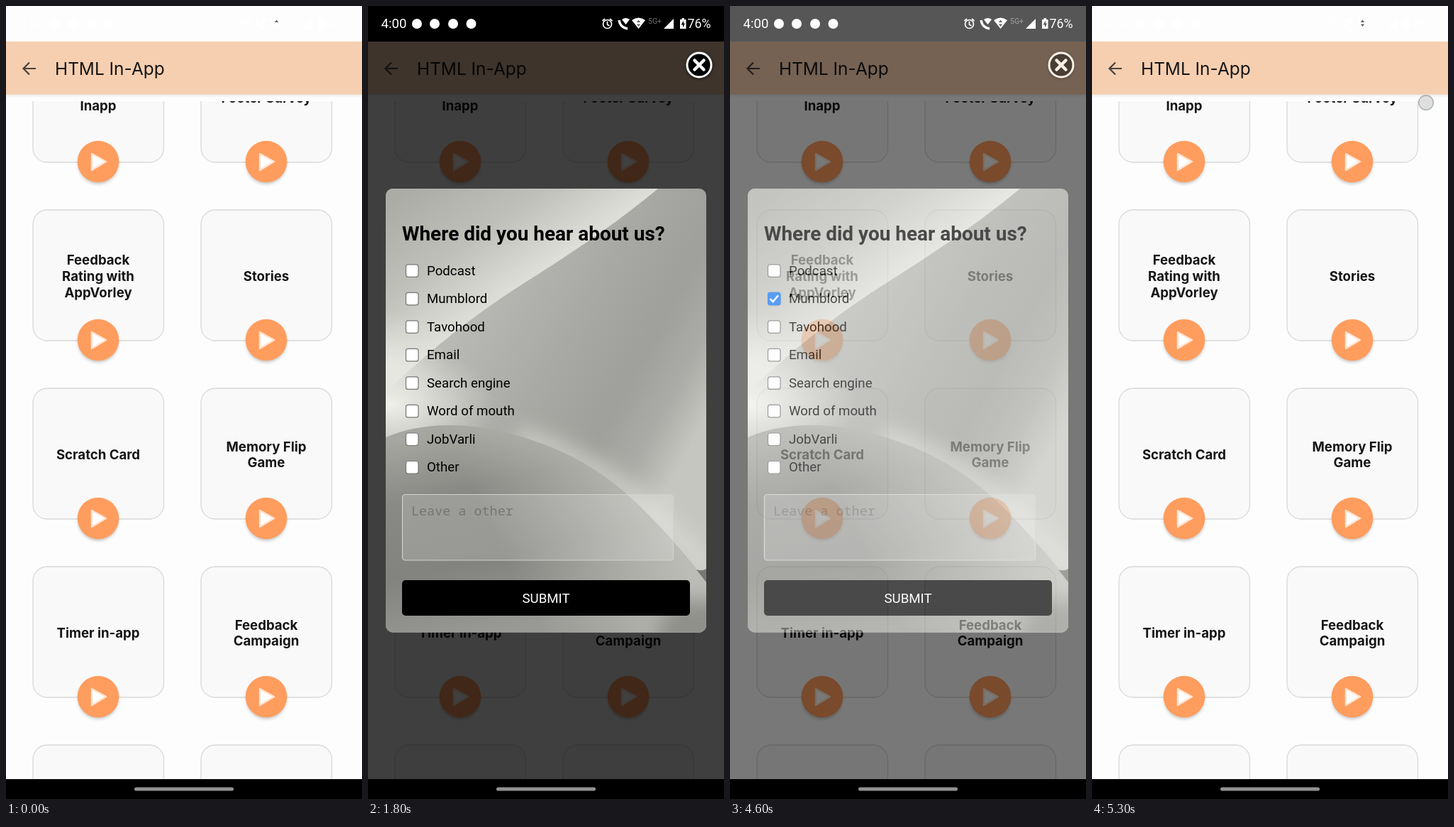
Animation, 502 px wide and 1116 px high, one loop 5.8 s. Source, as an HTML page:

```html
<!DOCTYPE html>
<html lang="en">
<head>
<meta charset="utf-8">
<title>In-app survey</title>
<style>
  html, body { margin: 0; width: 100%; height: 100%; overflow: hidden; background: #fdfdfd; }
  svg { display: block; width: 100vw; height: 100vh; }
  text { font-family: Roboto, sans-serif; }
  .app { font-family: Inter, sans-serif; fill: #151515; }
  .card { font-size: 18.6px; font-weight: 700; text-anchor: middle; }
  .option { font-size: 18.7px; }
  .hint { font-family: "Noto Sans Mono", monospace; font-size: 18.45px; fill: #757575; }
</style>
</head>
<body>
<svg viewBox="0 0 502 1116" preserveAspectRatio="none">
  <defs>
    <clipPath id="listClip"><rect y="134" width="502" height="954"/></clipPath>
    <clipPath id="dialogClip"><rect x="25" y="257" width="452" height="624.5" rx="10"/></clipPath>
    <filter id="soft" x="-30%" y="-30%" width="160%" height="160%"><feGaussianBlur stdDeviation="2.2"/></filter>
    <filter id="blur" x="-50%" y="-50%" width="200%" height="200%"><feGaussianBlur stdDeviation="13"/></filter>
    <linearGradient id="headerShade" x2="0" y2="1">
      <stop stop-color="#e9e9e9"/><stop offset="1" stop-color="#fdfdfd"/>
    </linearGradient>
    <linearGradient id="baseTone" gradientUnits="userSpaceOnUse" x1="150" y1="400" x2="477" y2="580">
      <stop stop-color="#b9bab5"/><stop offset=".45" stop-color="#a6a7a2"/>
      <stop offset=".68" stop-color="#9fa09b"/><stop offset=".85" stop-color="#abaca7"/>
      <stop offset="1" stop-color="#c5c6c0"/>
    </linearGradient>
    <linearGradient id="sweepTone" gradientUnits="userSpaceOnUse" x1="70" y1="250" x2="195" y2="430">
      <stop stop-color="#abaca6"/><stop offset=".5" stop-color="#bfc0ba"/><stop offset="1" stop-color="#e4e5df"/>
    </linearGradient>
    <linearGradient id="hillTone" gradientUnits="userSpaceOnUse" x1="130" y1="590" x2="190" y2="881">
      <stop stop-color="#a6a7a1"/><stop offset=".3" stop-color="#898a85"/>
      <stop offset=".65" stop-color="#82837e"/><stop offset="1" stop-color="#999a95"/>
    </linearGradient>
    <linearGradient id="hillLight" gradientUnits="userSpaceOnUse" x1="200" y1="790" x2="400" y2="690">
      <stop stop-color="#c0c1bb" stop-opacity="0"/><stop offset="1" stop-color="#c0c1bb" stop-opacity=".9"/>
    </linearGradient>
    <radialGradient id="glow">
      <stop stop-color="#f0f1eb"/><stop offset="1" stop-color="#e6e7e1" stop-opacity="0"/>
    </radialGradient>
    <path id="hill" d="M25 607C70 588 125 585 185 598C280 620 340 660 396 717Q442 764 477 811V882H25Z"/>
    <g id="play">
      <circle cy="3" r="28.5" fill="#000" opacity=".22" filter="url(#soft)"/>
      <circle r="29.3" fill="#ff9d5e"/>
      <path d="M-9-11V12L11 0Z" fill="#fff" stroke="#ffe3d0" stroke-width="2.5" stroke-linejoin="round"/>
    </g>
  </defs>

  <rect width="502" height="1116" fill="#fdfdfd"/>
  <g id="list" clip-path="url(#listClip)"></g>
  <rect y="124" width="502" height="5" fill="url(#headerShade)"/>
  <rect y="50" width="502" height="74.5" fill="#f6cfb0"/>
  <path d="M42 88H25M33 79.500L24.500 88L33 96.500" fill="none" stroke="#48433f" stroke-width="2.2"/>
  <text class="app" x="69" y="97" font-size="24.400">HTML In-App</text>

  <rect id="bar" width="502" height="50"/>
  <g id="overlay">
    <rect y="50" width="502" height="1038" opacity=".75"/>
    <circle cx="467" cy="84" r="19" opacity=".5" filter="url(#soft)"/>
    <circle cx="467" cy="83" r="17" stroke="#fff" stroke-width="3"/>
    <path d="M460.500 76.500l13 13m0-13l-13 13" stroke="#fff" stroke-width="4.500" stroke-linecap="round"/>
    <g id="dialog">
      <g clip-path="url(#dialogClip)">
        <rect x="25" y="257" width="452" height="625" fill="url(#baseTone)"/>
        <ellipse cx="30" cy="560" rx="150" ry="85" fill="url(#glow)"/>
        <path d="M25 257H409C350 306 290 346 220 390C140 440 78 494 25 543Z" fill="url(#sweepTone)"/>
        <ellipse cx="25" cy="505" rx="85" ry="75" fill="url(#glow)" opacity=".6"/>
        <path d="M210 606Q310 635 390 705T485 800" fill="none" stroke="#dcddd7" stroke-width="32" opacity=".6" filter="url(#blur)"/>
        <use href="#hill" fill="url(#hillTone)"/>
        <use href="#hill" fill="url(#hillLight)"/>
        <ellipse cx="470" cy="880" rx="60" ry="45" fill="#858681" opacity=".8" filter="url(#blur)"/>
        <path d="M463 793Q471 796 477 792V811Z" fill="#777873"/>
      </g>
      <text x="48" y="329.500" font-size="27.950" font-weight="700">Where did you hear about us?</text>
      <g id="options"></g>
      <rect x="48.500" y="687.500" width="382" height="92.500" rx="4" fill="#fff" fill-opacity=".17" stroke="#d0d1cc" stroke-width="1.200"/>
      <text class="hint" x="61" y="717">Leave a other</text>
      <rect id="submit" x="48" y="808" width="406" height="50" rx="5"/>
      <text x="251" y="839.500" font-size="18.700" text-anchor="middle" fill="#fff">SUBMIT</text>
    </g>
  </g>

  <g fill="#fff">
    <text x="18.500" y="31.300" font-size="18.700">4:00</text>
    <circle cx="69" cy="25" r="7"/><circle cx="94" cy="25" r="7"/>
    <circle cx="120" cy="25" r="7"/><circle cx="145.500" cy="25" r="7"/>
    <g fill="none" stroke="#fff" stroke-width="1.700">
      <circle cx="337.500" cy="25.500" r="6"/>
      <path d="M337.500 21.500V26L340.500 28M330.500 21L334 18M341 18L344.500 21"/>
      <path d="M354 20C355 27 360 31 366 32" stroke-width="3.500"/>
    </g>
    <path d="M358 19Q363.500 15 369 19L363.500 26Z"/>
    <path d="M372 20Q381.500 13 391 20L381.500 32Z"/>
    <text x="395" y="25" font-size="10.500" opacity=".45">5G+</text>
    <path d="M417 32L431 18V32Z"/>
    <path d="M440 19H442.500V17H446V19H448.500V32H440Z"/>
    <path id="bolt" d="M445 20.500L441.500 26.500H444V30.500L447 24.500H445Z" fill="#000"/>
    <text x="450.500" y="31.300" font-size="17.800">76%</text>
  </g>
  <path d="M378.800 23L381.500 19.500L384.200 23Z" fill="#666"/>
  <path id="download" d="M378.800 25.500L381.500 29L384.200 25.500Z" fill="#666"/>

  <rect y="1088" width="502" height="28"/>
  <rect x="181" y="1099.500" width="140" height="5" rx="2.500" fill="#929292"/>
  <circle id="touch" r="10.300" fill="#ccc" stroke="#98a0a4" stroke-width="1.400"/>
</svg>
<script>
  const LOOP = 5800;
  const el = id => document.getElementById(id);
  const between = (t, start, end) => t >= start && t < end;
  const show = (node, visible) => node.setAttribute("visibility", visible ? "inherit" : "hidden");

  const rows = [
    [["Html", "Inapp"], ["Footer Survey"]],
    [["Feedback", "Rating with", "AppVorley"], ["Stories"]],
    [["Scratch Card"], ["Memory Flip", "Game"]],
    [["Timer in-app"], ["Feedback", "Campaign"]],
    [[], []]
  ];

  function card(lines, row, column) {
    const x = 38 + 237 * column, y = 36 + 251 * row, middle = x + 92;
    const labels = lines.map((line, i) => {
      const baseline = y + 100 + (i - (lines.length - 1) / 2) * 22.8;
      return `<text class="app card" x="${middle}" y="${baseline}">${line}</text>`;
    }).join("");
    return `<rect x="${x}" y="${y}" width="184.5" height="184" rx="20" fill="#f9f9f9" stroke="#d9d9d9" stroke-width="1.3"/>
      ${labels}<use href="#play" x="${middle}" y="${y + 183}"/>`;
  }
  el("list").innerHTML = rows.flatMap((row, r) => row.map((lines, c) => card(lines, r, c))).join("");

  const options = ["Podcast", "Mumblord", "Tavohood", "Email", "Search engine", "Word of mouth", "JobVarli", "Other"];
  el("options").innerHTML = options.map((name, i) => {
    const y = 372.3 + 39.53 * i;
    return `<rect x="53.5" y="${y - 8.5}" width="17.500" height="17.500" rx="3" fill="#fff" stroke="#767676" stroke-width="1.2"/>
      <text class="option" x="83" y="${y + 6.3}">${name}</text>`;
  }).join("") + `<g id="tick"><rect x="53" y="402.700" width="18.500" height="18.500" rx="3" fill="#1877f2"/>
      <path d="M56.500 412l4 4.200l7.500-9" fill="none" stroke="#fff" stroke-width="2.500"/></g>`;

  // Stepped fades: [start time, overlay opacity, status bar opacity]
  const fades = [
    [0, 0, 0], [800, .3, .3], [900, .7, .7], [1000, 1, 1],
    [4400, .98, .98], [4500, .91, .93], [4600, .7, .66], [4700, .46, .34], [4800, 0, 0]
  ];
  // Touches: [start, end, x, y, fill opacity, stroke opacity]
  const touches = [
    [3500, 3600, 138, 422, .1, .8], [3600, 3800, 138, 422, .45, .8],
    [4300, 4600, 283, 838, .25, .35], [5300, LOOP, 471, 136, .6, .8]
  ];

  function draw(t) {
    const [, overlay, bar] = fades.findLast(step => t >= step[0]);
    el("overlay").setAttribute("opacity", overlay);
    el("bar").setAttribute("opacity", bar);
    el("bolt").setAttribute("opacity", bar);
    show(el("dialog"), t >= 1200);
    show(el("tick"), t >= 3600);
    show(el("download"), t >= 1800);
    el("submit").setAttribute("fill", between(t, 4300, 4600) ? "#133442" : "#000");

    const touch = touches.find(([start, end]) => between(t, start, end));
    show(el("touch"), touch);
    if (touch) {
      const [, , x, y, fill, stroke] = touch;
      el("touch").setAttribute("transform", `translate(${x} ${y})`);
      el("touch").setAttribute("fill-opacity", fill);
      el("touch").setAttribute("stroke-opacity", stroke);
    }
  }

  function tick(now) {
    draw(now % LOOP);
    requestAnimationFrame(tick);
  }
  draw(0);
  requestAnimationFrame(tick);
</script>
</body>
</html>
```
